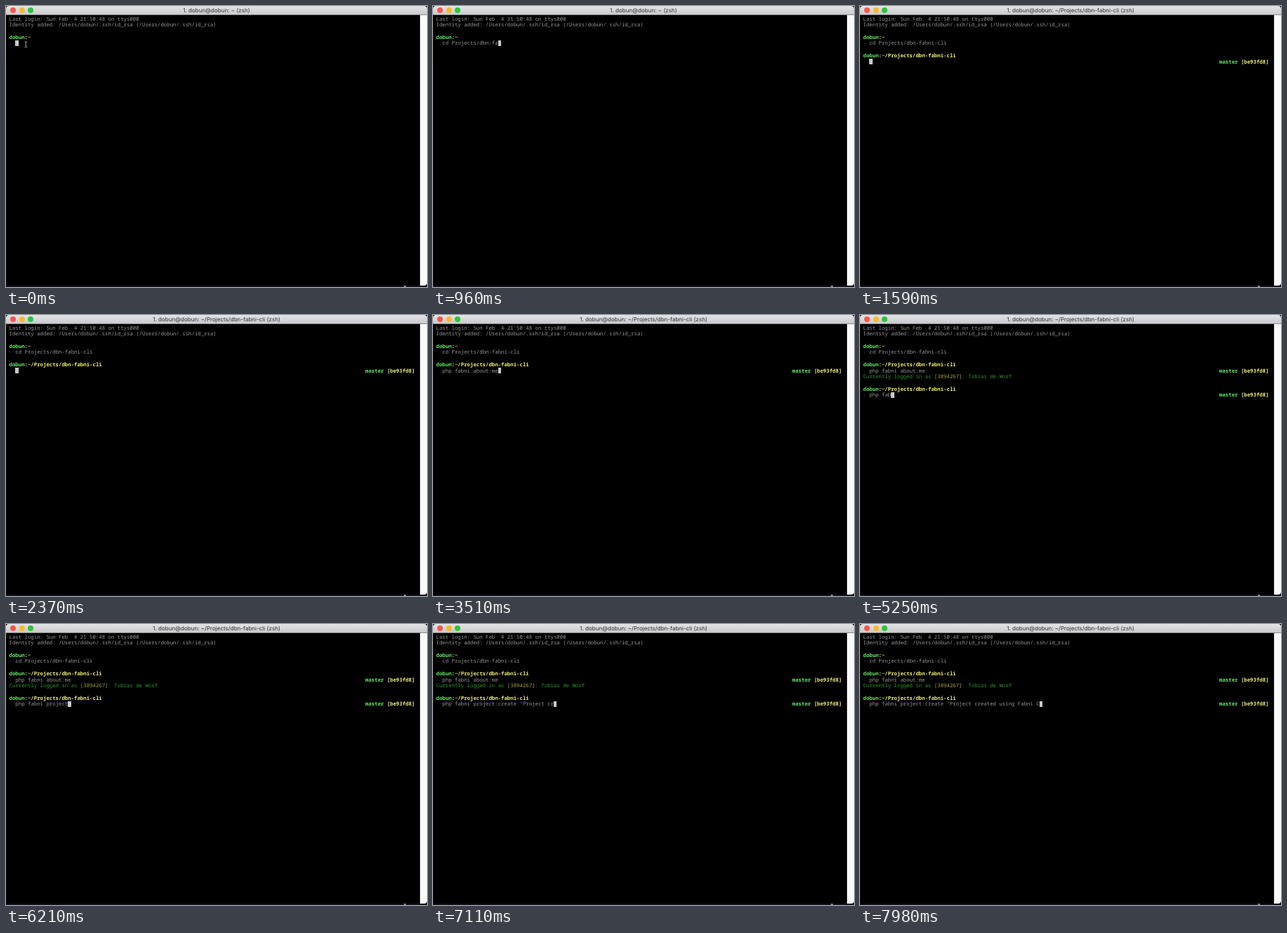
Animation of 600 by 400 pixels, one loop 8 s. Source, as an HTML page:

```html
<!DOCTYPE html>
<html lang="en">
<head>
<meta charset="utf-8">
<title>Terminal</title>
<style>
  html, body { margin: 0; width: 100%; height: 100%; overflow: hidden; background: #000; }
  #stage { position: relative; width: 600px; height: 400px; overflow: hidden; background: #000; }
  #stage > * { position: absolute; }
  .bar {
    left: 0; top: 0; width: 600px; height: 12px; border-bottom: 1px solid #8a8a8e;
    border-radius: 4px 4px 0 0; background: linear-gradient(#e4e4e6, #cacace);
  }
  .dot { top: 2px; width: 8px; height: 8px; border-radius: 50%; }
  #title {
    left: 0; top: 0; width: 600px; text-align: center; white-space: pre;
    font: 8.05px/12px Inter, sans-serif; color: #303030; text-rendering: geometricPrecision;
  }
  .scroll { left: 590px; top: 13px; width: 10px; height: 385px; background: #fafafa; border-radius: 0 0 4px 0; box-sizing: border-box; border-left: 1px solid #e4e4e4; }
  .left { left: 0; top: 80px; width: 1px; height: 320px; background: #08081e; }
  .bottom { left: 0; top: 398px; width: 600px; height: 2px; background: #10101e; }
  .mark { left: 567px; top: 398px; width: 3px; height: 2px; background: #8a8a8a; }
  .row {
    left: 4.5px; width: 580px; height: 8.71px; white-space: pre; color: #969696;
    font: 7.35px/8.71px "Noto Sans Mono", "DejaVu Sans Mono", monospace;
    text-rendering: geometricPrecision; font-variant-ligatures: none;
  }
  .row b { font-weight: 600; }
  .user, .branch { color: #62ea62; }
  .path { color: #f0f066; }
  .hash { color: #f0f07c; }
  .reply { color: #2a9a2a; }
  .id { color: #a4a440; }
  .arrow { color: #1c1c78; }
  .git { position: absolute; left: 507.5px; top: 0; }
  #cursor { width: 4.4px; height: 8px; background: #cacaca; }
  #mouse { left: 26px; top: 50px; }
</style>
</head>
<body>
<div id="stage">
  <div class="bar"></div>
  <div class="dot" style="left:6px;background:#f8564c"></div>
  <div class="dot" style="left:18.5px;background:#f8b92c"></div>
  <div class="dot" style="left:31px;background:#2cc43c"></div>
  <div id="title"></div>
  <div class="left"></div>
  <div class="bottom"></div>
  <div class="mark"></div>
  <div class="scroll"></div>
  <div id="cursor"></div>
  <svg id="mouse" width="5" height="10" fill="none" stroke="#c8c8c8" stroke-width=".9">
    <path d="M.7 .7Q2 .7 2.3 1.8Q2.6 .7 4 .7M2.3 1.8V7.6M.7 8.8Q2 8.8 2.3 7.6Q2.6 8.8 4 8.8"/>
  </svg>
</div>
<script>
const LOOP = 8000, STEP = 30;
const LEFT = 4.5, TEXT_TOP = 14.6, CURSOR_TOP = 14.3, ROW = 8.71, CHAR = 4.41;
const CD_DONE = 1560, RUN = 3690, RUN_DONE = 4200;

const stage = document.getElementById('stage');
const title = document.getElementById('title');
const cursor = document.getElementById('cursor');
const mouse = document.getElementById('mouse');

const rows = [];
function addRow(index, from, html) {
  const el = document.createElement('div');
  el.className = 'row';
  el.style.top = TEXT_TOP + index * ROW + 'px';
  el.innerHTML = html;
  stage.insertBefore(el, mouse);
  rows.push({ el, from });
  return el;
}

const promptLine = path => `<b class="user">dobun</b><b class="path">:${path}</b>`;
const git = '<b class="git"><span class="branch">master</span> <span class="hash">[be93fd8]</span></b>';
const projectPath = '~/Projects/dbn-fabni-cli';

addRow(0, 0, 'Last login: Sun Feb  4 21:50:48 on ttys000');
addRow(1, 0, 'Identity added: /Users/dobun/.ssh/id_rsa (/Users/dobun/.ssh/id_rsa)');
addRow(3, 0, promptLine('~'));
addRow(6, CD_DONE, promptLine(projectPath));
addRow(8, RUN_DONE, '<span class="reply">Currently logged in as <span class="id">[3894267]</span>: Tobias de Worf</span>');
addRow(10, RUN_DONE, promptLine(projectPath));

// keys: [time, characters typed], linear in between
const commands = [
  { row: 4, from: 0, text: 'cd Projects/dbn-fabni-cli', keys: [[100, 0], [940, 18], [1290, 25]] },
  { row: 7, from: CD_DONE, text: 'php fabni about:me', git, keys: [[2520, 0], [3450, 18]] },
  { row: 11, from: RUN_DONE, text: 'php fabni project:create "Project created using Fabni C', git,
    keys: [[4860, 0], [5230, 7], [6190, 17], [7960, 55]] }
];
for (const c of commands) {
  const el = addRow(c.row, c.from, `<span class="arrow">›</span> <span class="typed"></span>${c.git || ''}`);
  c.typed = el.querySelector('.typed');
}

function typedCount(keys, t) {
  let count = 0;
  keys.forEach(([time, n], i) => {
    if (t >= time) {
      const next = keys[i + 1];
      count = next
        ? n + (next[1] - n) * Math.min(1, (t - time) / (next[0] - time))
        : n;
    }
  });
  return Math.floor(count + 1e-6);
}

function placeCursor(row, column) {
  cursor.style.left = LEFT + column * CHAR + 'px';
  cursor.style.top = CURSOR_TOP + row * ROW + 'px';
}

function draw(now) {
  const t = Math.floor((now % LOOP) / STEP) * STEP;
  title.textContent = `1. dobun@dobun: ${t < CD_DONE ? '~' : projectPath} (zsh)`;
  for (const { el, from } of rows) el.style.visibility = t >= from ? 'visible' : 'hidden';
  for (const c of commands) {
    const count = typedCount(c.keys, t);
    c.typed.textContent = c.text.slice(0, count);
    if (t >= c.from) placeCursor(c.row, count + 2);
  }
  if (t >= RUN && t < RUN_DONE) placeCursor(8, 0);
  mouse.style.visibility = t < commands[0].keys[0][0] ? 'visible' : 'hidden';
}

const start = performance.now();
function tick() {
  draw(performance.now() - start);
  requestAnimationFrame(tick);
}
tick();
</script>
</body>
</html>
```
